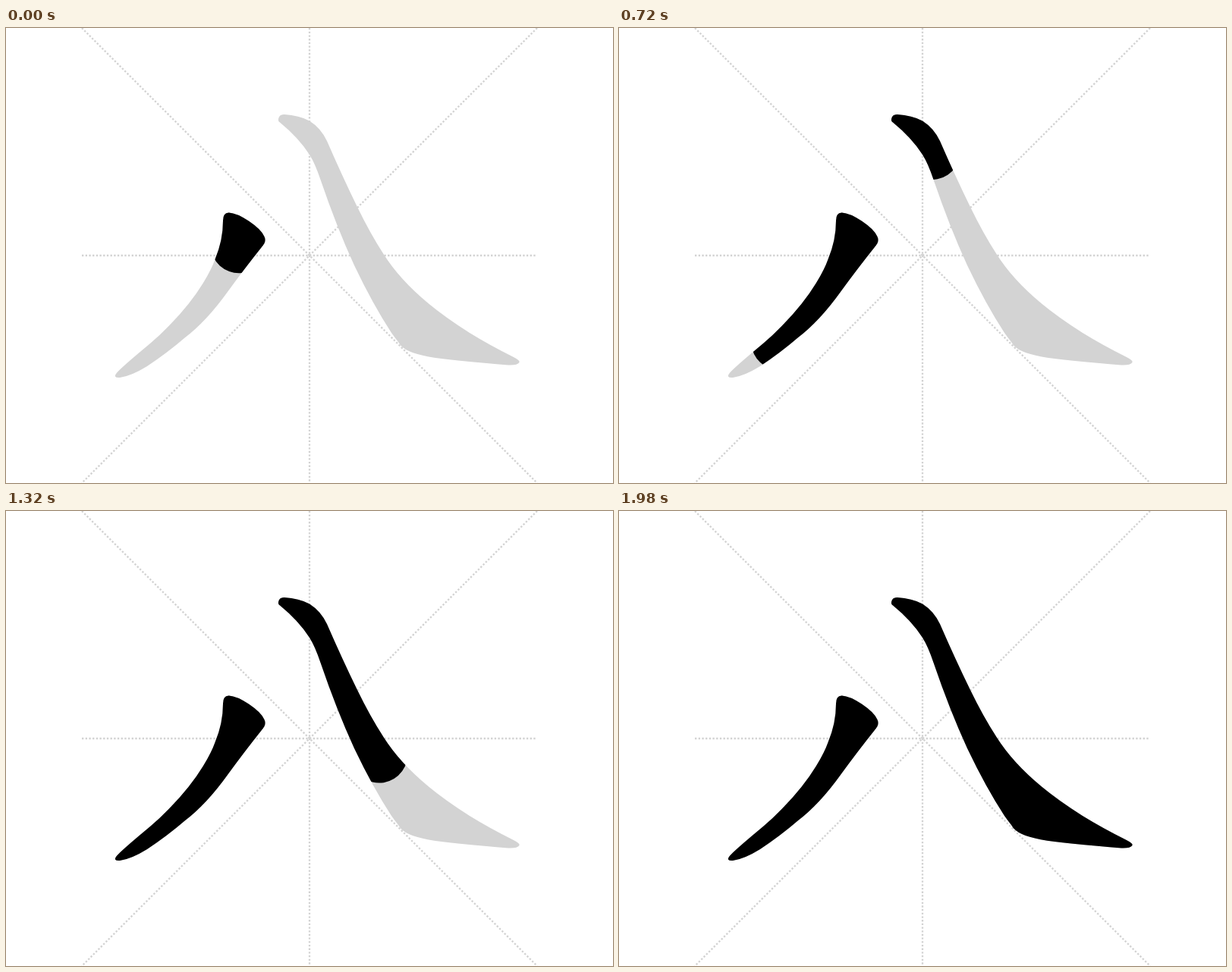
Recreate the animation shown at these times as an HTML page with a canvas. Size 800x600 px, loop 2040 ms.

```html
<!DOCTYPE html>
<html lang="en">
<head>
<meta charset="utf-8">
<title>Stroke order</title>
<style>
html, body { margin: 0; width: 100%; height: 100%; overflow: hidden; background: #fff; }
canvas { display: block; }
</style>
</head>
<body>
<canvas id="stage" width="800" height="600"></canvas>
<script>
const ctx = document.getElementById('stage').getContext('2d');
const LOOP = 2040, STEP = 60;
const UNIT = 600 / 256;
const BRUSH = 75;
const GREY = '#d3d3d3';

// Each stroke: outline, brush path, start time (ms), speed (px/ms), length already drawn at start.
const strokes = [
  {
    shape: new Path2D('M286 254Q286 243 294 243.5Q304 244 320 254.5Q337 266 340.5 275Q343.5 281 338.5 287' +
      'Q313 319 292 348Q264 387 235 409Q213 428 186 446Q165 459 150 461Q141 461.5 145 456Q149 450 190 416' +
      'Q203 405 215 392.5Q243 364 260 336Q271 318 275.5 305Q286 280 286 254Z'),
    path: [[306, 264], [307, 285.7], [280, 332], [247, 373.5], [212, 413.7], [160, 452]],
    start: 0, speed: 0.2225, lead: 21.7
  },
  {
    shape: new Path2D('M359 120Q360 113.5 367 114Q386 115 400 122.5Q415 132 423 149Q443 195 463 236' +
      'Q480 271 497.5 298Q519 332 556.5 363Q578 381 611 402Q637 418 668 433.5Q678 438.5 676.5 441' +
      'Q674 445 662 444.5Q632 442 596 438.5Q548 434 531 426Q521 421.5 517 414Q513 409 508 402' +
      'Q483.5 364.5 459 313Q436 263 414.5 200Q407.5 179 400 167Q386 145 361 124.5Q358.5 123 359 120Z'),
    path: [[375, 126], [398, 141], [412.4, 162.6], [463.8, 275.8], [519.7, 366.4],
      [541, 391.5], [574, 407.7], [660, 436]],
    start: 540, speed: 0.296, lead: 0.1
  }
];

function drawGuides() {
  ctx.strokeStyle = GREY;
  ctx.lineWidth = UNIT;
  ctx.lineCap = 'butt';
  ctx.setLineDash([UNIT, UNIT]);
  for (const [x1, y1, x2, y2] of [
    [100, 0, 700, 600], [700, 0, 100, 600], [400, 0, 400, 600], [100, 300, 700, 300]
  ]) {
    ctx.beginPath();
    ctx.moveTo(x1, y1);
    ctx.lineTo(x2, y2);
    ctx.stroke();
  }
  ctx.setLineDash([]);
}

function tracePath(points, length) {
  ctx.beginPath();
  ctx.moveTo(...points[0]);
  for (let i = 1; i < points.length && length > 0; i++) {
    const [ax, ay] = points[i - 1], [bx, by] = points[i];
    const size = Math.hypot(bx - ax, by - ay);
    const k = Math.min(1, length / size);
    ctx.lineTo(ax + (bx - ax) * k, ay + (by - ay) * k);
    length -= size;
  }
}

function drawInk(stroke, t) {
  if (t < stroke.start) return;
  ctx.save();
  ctx.clip(stroke.shape);
  ctx.strokeStyle = '#000';
  ctx.lineWidth = BRUSH;
  ctx.lineCap = ctx.lineJoin = 'round';
  tracePath(stroke.path, stroke.lead + (t - stroke.start) * stroke.speed);
  ctx.stroke();
  ctx.restore();
}

function draw(t) {
  ctx.fillStyle = '#fff';
  ctx.fillRect(0, 0, 800, 600);
  drawGuides();
  ctx.fillStyle = GREY;
  for (const s of strokes) ctx.fill(s.shape);
  for (const s of strokes) drawInk(s, t);
}

const begin = performance.now();
function tick() {
  const t = (performance.now() - begin) % LOOP;
  draw(Math.floor(t / STEP) * STEP);
  requestAnimationFrame(tick);
}
tick();
</script>
</body>
</html>
```
